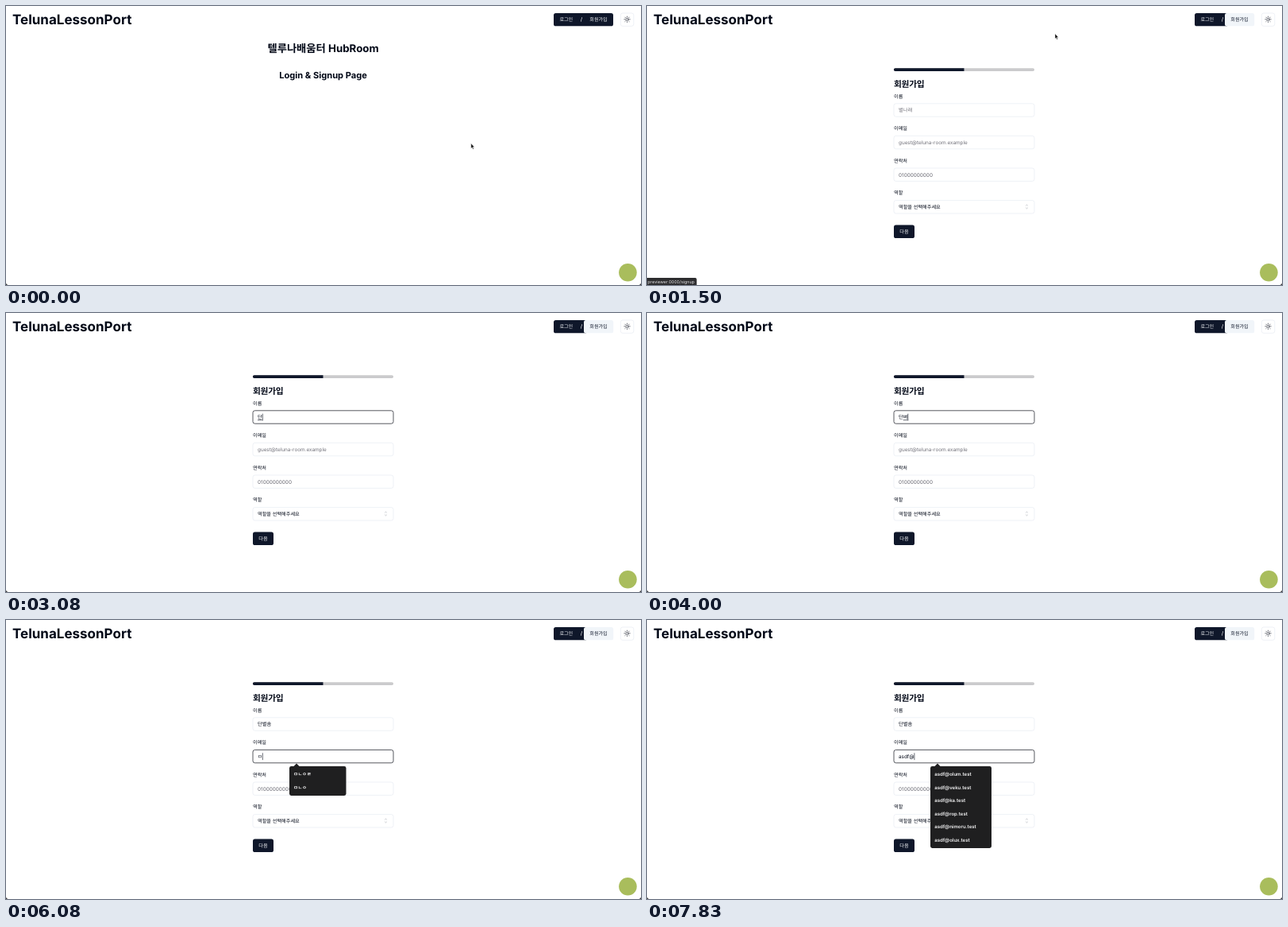
These frames come from a looping animation (800x351 px, 8000 ms). An HTML page:

```html
<!DOCTYPE html>
<html lang="ko">
<head>
<meta charset="utf-8">
<title>회원가입</title>
<style>
  html, body { margin: 0; width: 100%; height: 100%; overflow: hidden; background: #fff; }
  svg { display: block; width: 100%; height: 100%; }
  text {
    font-family: Inter, "Noto Sans CJK KR", "Noto Sans CJK", sans-serif;
    text-rendering: geometricPrecision;
    white-space: pre;
  }
</style>
</head>
<body>
<svg id="stage" viewBox="0 0 800 351"></svg>
<script>
const NS = "http://www.w3.org/2000/svg";
const INK = "#020817", NAVY = "#0f172a", LINE = "#e2e8f0", HINT = "#71717a";
const FPS = 12, LOOP = 8000;
const stage = document.getElementById("stage");

function add(parent, tag, attrs = {}, content) {
  const el = document.createElementNS(NS, tag);
  for (const key in attrs) el.setAttribute(key, attrs[key]);
  if (content !== undefined) el.textContent = content;
  parent.appendChild(el);
  return el;
}
const group = parent => add(parent, "g");
const show = (el, on) => el.setAttribute("display", on ? "inline" : "none");
const rect = (parent, x, y, width, height, fill, rx = 0, more = {}) =>
  add(parent, "rect", { x, y, width, height, fill, rx, ...more });
const label = (parent, x, y, size, weight, fill, str, more = {}) =>
  add(parent, "text", { x, y, "font-size": size, "font-weight": weight, fill, ...more }, str);
const MID = { "text-anchor": "middle" };

// Header
label(stage, 8, 23, 17, 700, INK, "TelunaLessonPort");
rect(stage, 690, 9, 75, 16.3, NAVY, 2.6);
label(stage, 705.8, 19.3, 6.1, 500, "#f8fafc", "로그인", MID);
label(stage, 725, 19.3, 6.4, 500, "#f8fafc", "/", MID);
const signupLit = group(stage);
rect(signupLit, 731, 8, 35, 18.5, "#fff");
rect(signupLit, 728, 9, 37.2, 16.3, "#f1f5f9", 2.6);
const signupText = label(stage, 746.5, 19.3, 6.1, 500, "#f8fafc", "회원가입", MID);

rect(stage, 774.3, 9, 16.5, 16.3, "#fff", 2.6, { stroke: LINE, "stroke-width": 0.6 });
const sun = add(stage, "g", {
  transform: "translate(782.5 16.8)", fill: "none", stroke: INK,
  "stroke-width": 0.6, "stroke-linecap": "round"
});
add(sun, "circle", { r: 1.6 });
for (let a = 0; a < 360; a += 45)
  add(sun, "path", { d: "M0 -3V-3.7", transform: `rotate(${a})` });

// Home page
const home = group(stage);
label(home, 399.5, 58, 13.3, 700, INK, "텔루나배움터 HubRoom", MID);
label(home, 399.5, 90.6, 11.1, 700, INK, "Login & Signup Page", MID);

// Sign-up form
const form = group(stage);
rect(form, 311, 78.2, 177, 3.8, "#cbcbcd", 1.8);
add(form, "path", { d: "M399.5 78.2H312.8a1.9 1.9 0 0 0 0 3.8H399.5Z", fill: NAVY });
label(form, 311, 102, 10.7, 700, INK, "회원가입", { "letter-spacing": "-0.02em" });

const fieldTop = i => 122.8 + 40.6 * i;
["이름", "이메일", "연락처", "역할"].forEach((name, i) =>
  label(form, 311, fieldTop(i) - 7.2, 6.16, 500, INK, name));

function field(i, hint, hintSize) {
  const top = fieldTop(i), base = top + 10.5;
  const box = rect(form, 311, top, 177, 16.4, "#fff", 2.6);
  const hintText = label(form, 317, base, hintSize, 400, HINT, hint);
  const value = label(form, 317, base, 6.2, 400, INK, "");
  const under = rect(form, 317, base + 1.2, 5, 0.6, INK);
  const caret = rect(form, 317, top + 3.9, 0.6, 8.8, INK);
  const width = () => value.textContent ? value.getComputedTextLength() : 0;

  return function set({ str = "", focused = false, caretOn = false }) {
    box.setAttribute("stroke", focused ? "#43464d" : LINE);
    box.setAttribute("stroke-width", focused ? 0.9 : 0.6);
    show(hintText, !str);
    value.setAttribute("font-size", /[a-z]/.test(str) ? 6.4 : 6.2);
    value.textContent = str.slice(0, -1);
    const start = width();
    value.textContent = str;
    const end = width();
    const composing = focused && /[가-힣]$/.test(str);
    show(under, composing);
    under.setAttribute("x", 317 + start);
    under.setAttribute("width", Math.max(0, end - start));
    show(caret, caretOn);
    caret.setAttribute("x", 317.2 + end);
  };
}
const setName = field(0, "별나래", 6.2);
const setEmail = field(1, "guest@teluna-room.example", 6.35);
field(2, "01000000000", 6.4)({});

rect(form, 311, fieldTop(3), 177, 16.4, "#fff", 2.6, { stroke: LINE, "stroke-width": 0.6 });
label(form, 317, fieldTop(3) + 10.2, 6.16, 400, INK, "역할을 선택해주세요");
add(form, "path", {
  d: "M477.2 251.3l1.3-1.2 1.3 1.2M477.2 253.7l1.3 1.2 1.3-1.2",
  fill: "none", stroke: "#8b8f98", "stroke-width": 0.5
});
rect(form, 311, 275.5, 26, 16.5, NAVY, 2.6);
label(form, 324, 285.9, 6.16, 500, "#f8fafc", "다음", MID);

// Autofill popups
function popup(i, width, rows) {
  const g = group(stage), top = fieldTop(i) + 20.6;
  rect(g, 357, top, width, 20.5 + 16.5 * (rows.length - 1), "#1f1f20", 2.4);
  add(g, "path", { d: `M362 ${top + 0.5}L366 ${top - 3.6}L370 ${top + 0.5}Z`, fill: "#1f1f20" });
  rows.forEach((row, k) =>
    label(g, 362.2, top + 12.3 + 16.5 * k, 6.05, 600, "#f4f4f5", row));
  return g;
}
const mails = ["olum", "veku", "ka", "rop", "nimoru", "olux"].map(d => `asdf@${d}.test`);
// Each popup is visible from its first step up to its last.
const popups = [
  { from: 25, to: 31, el: popup(0, 71.5, ["asdf", "awef", "No State", "test", "To Do", "In Progress.."]) },
  { from: 72, to: 79, el: popup(1, 71.5, ["ㅁㄴㅇㄹ", "ㅁㄴㅇ"]) },
  { from: 79, to: 85, el: popup(1, 71.5, ["ㅁㄴㅇㄹ"]) },
  { from: 88, to: 94, el: popup(1, 83, ["asdf", ...mails.slice(0, 5)]) },
  { from: 94, to: 96, el: popup(1, 77, mails) }
];

// Corner badge and window corners
add(stage, "circle", { cx: 783.4, cy: 335.2, r: 11.3, fill: "#a9bd5c" });
add(stage, "path", { d: "M0 348.6Q0.3 351 2.6 351H0ZM800 348.6Q799.7 351 797.4 351H800Z", fill: "#222" });

const status = group(stage);
add(status, "path", { d: "M0 342H60.6Q62.6 342 62.6 344V351H0Z", fill: "#2d2d2f" });
label(status, 1, 348.6, 5.35, 400, "#e8e8ea", "previewer:0000/signup");

// Pointers, drawn with the hot spot at 0,0
const pointers = {
  arrow: add(stage, "path", {
    d: "M0 0V6.4L1.4 5.2L2.4 7.5L3.5 7L2.5 4.8H4.4Z",
    fill: "#111", stroke: "#fff", "stroke-width": 0.5
  }),
  hand: add(stage, "path", {
    d: "M0.4 0.6Q1 -0.2 1.6 0.6V3L4.6 3.6Q5.4 4 5.2 5L4.5 8H1.1L-0.9 5.2Q-0.9 4.2 0.4 4.8Z",
    fill: "#fff", stroke: "#111", "stroke-width": 0.6
  }),
  beam: add(stage, "path", {
    d: "M-1.5 -3.8Q0 -3.8 0 -3V3Q0 3.8 -1.5 3.8M1.5 -3.8Q0 -3.8 0 -3M0 3Q0 3.8 1.5 3.8",
    fill: "none", stroke: "#111", "stroke-width": 0.75
  })
};

const easeOut = u => 1 - (1 - u) ** 2;
const easeIn = u => u ** 1.6;
const smooth = u => u * u * (3 - 2 * u);
// Step, x, y, easing towards this point
const route = [
  [0, 585.8, 172.8],
  [6, 778, 30, smooth],
  [8.5, 741, 15, easeOut],
  [15.4, 741, 15, easeOut],
  [18, 514, 34.8, easeIn],
  [23.5, 352.4, 128.8, easeOut]
];
function pointerAt(step) {
  const next = route.findIndex(p => p[0] > step);
  if (next < 0) return route[route.length - 1].slice(1);
  const a = route[next - 1], b = route[next];
  const u = b[3]((step - a[0]) / (b[0] - a[0]));
  return [a[1] + (b[1] - a[1]) * u, a[2] + (b[2] - a[2]) * u];
}

// Typed text as [step, string]
const nameKeys = [
  [25, ""], [31, "ㄷ"], [33, "다"], [36, "단"], [38, "단ㅂ"], [40, "단ㅂㅅ"], [42, "단ㅂ"],
  [44, "단"], [46, "단ㅂ"], [48, "단벼"], [50, "단별"], [52, "단별ㅅ"], [54, "단별소"], [55, "단별솜"]
];
const emailKeys = [
  [56, ""], [72, "ㅁ"], [79, "ㅁㄴ"], [84, "ㅁ"], [85, ""],
  [87, "a"], [88, "as"], [90, "asd"], [91, "asdf"], [93, "asdf@"]
];
function typed(keys, step, focused) {
  const past = keys.filter(k => k[0] <= step);
  if (!past.length) return {};
  const [at, str] = past[past.length - 1];
  return { str, focused, caretOn: focused && Math.floor((step - at) / 6) % 2 === 0 };
}

function draw(step) {
  const hovered = step >= 8, onForm = step >= 12;
  show(signupLit, hovered);
  signupText.setAttribute("fill", hovered ? NAVY : "#f8fafc");
  show(home, !onForm);
  show(form, onForm);
  show(status, step >= 8 && step < 22);

  setName(typed(nameKeys, step, step >= 25 && step < 56));
  setEmail(typed(emailKeys, step, step >= 56));
  for (const p of popups) show(p.el, step >= p.from && step < p.to);

  const [x, y] = pointerAt(step);
  const kind = step >= 31 ? "" : y > 122 && step > 18 ? "beam" : step >= 8 && step < 16 ? "hand" : "arrow";
  for (const k in pointers) {
    show(pointers[k], k === kind);
    pointers[k].setAttribute("transform", `translate(${x} ${y})`);
  }
}

const began = performance.now();
let last = -1;
function tick() {
  const t = (performance.now() - began) % LOOP;
  const step = Math.floor((t + 4) * FPS / 1000) % (LOOP * FPS / 1000);
  if (step !== last) draw(last = step);
  requestAnimationFrame(tick);
}
tick();
</script>
</body>
</html>
```
